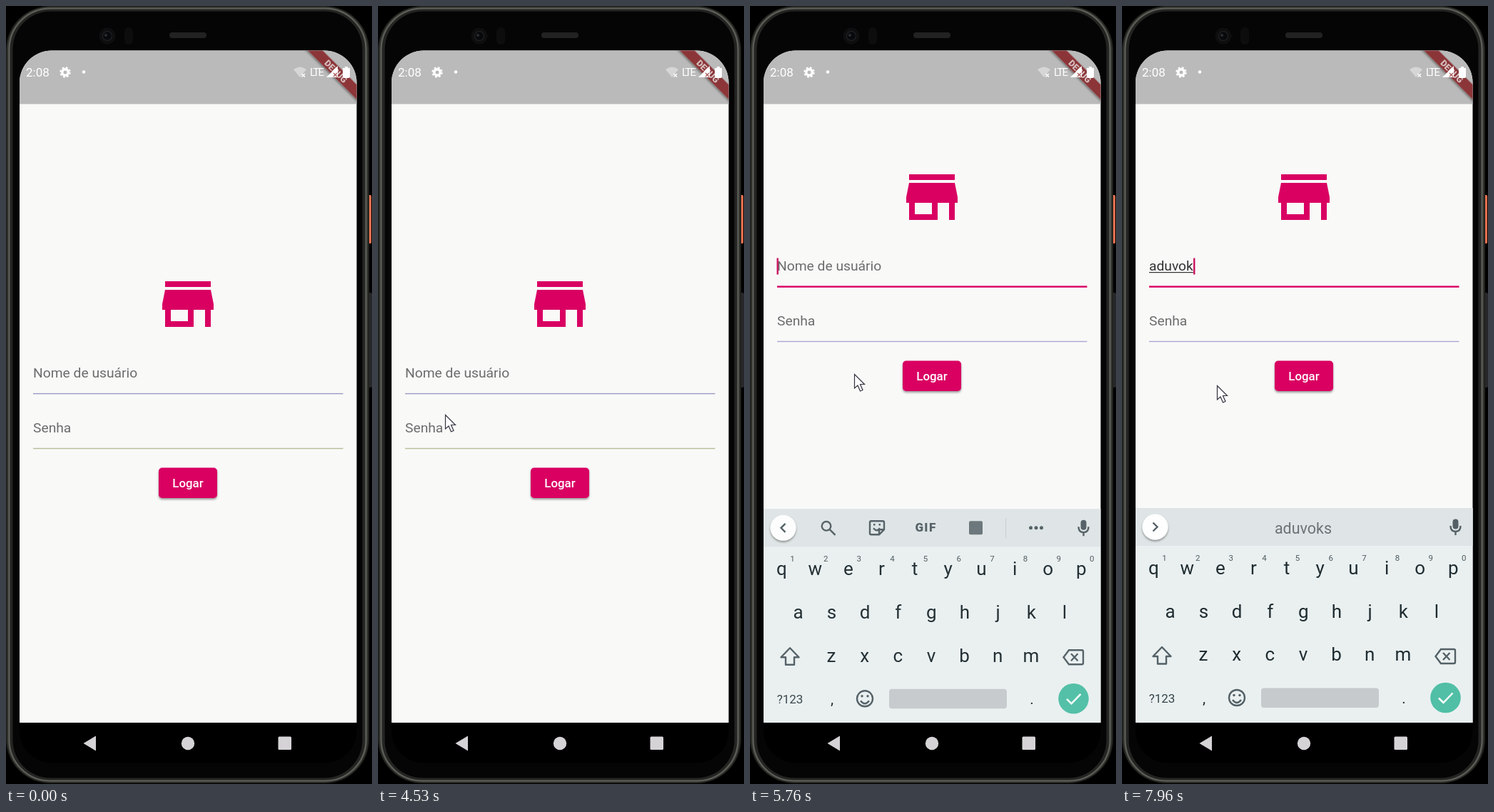
These frames come from a looping animation (513 by 1091 pixels, 8 s). An HTML page:

```html
<!DOCTYPE html>
<html lang="pt">
<head>
<meta charset="utf-8">
<title>Login</title>
<style>
  html, body { margin: 0; width: 100%; height: 100%; overflow: hidden; background: #000; }
  svg { display: block; width: 513px; height: 1091px; }
  text { font-family: Roboto, sans-serif; }
  .mid { text-anchor: middle; }
  .hint { font-size: 19.26px; fill: #6c6c6c; }
  .key { font-size: 26px; fill: #1f2c31; }
  .num { font-size: 11.5px; fill: #4e5a5f; }
  .word { font-size: 21.5px; fill: #6b7377; }
  .line { fill: none; stroke: #536066; stroke-width: 2.4; }
</style>
</head>
<body>
<svg viewBox="0 0 513 1091" xmlns="http://www.w3.org/2000/svg">
  <defs>
    <clipPath id="screen"><rect x="19" y="62.5" width="472.5" height="999" rx="45"/></clipPath>
    <clipPath id="app"><rect x="19" y="62" width="473" height="943"/></clipPath>
    <filter id="shade" x="-20%" y="-20%" width="140%" height="160%">
      <feDropShadow dx="0" dy="2" stdDeviation="1.6" flood-opacity=".4"/>
    </filter>
  </defs>

  <!-- phone body -->
  <rect width="513" height="1091"/>
  <rect x="506" y="265" width="6" height="68" rx="1.5" fill="#e5704f"/>
  <rect x="506" y="402" width="7" height="133" rx="2" fill="#26272a"/>
  <rect x="0" y="0" width="509" height="1090" rx="62" fill="#22231f"/>
  <rect x="2" y="1.5" width="505" height="1087" rx="60" fill="#3a3c37"/>
  <rect x="4.500" y="3.500" width="500" height="1083" rx="57.500" fill="#242522" stroke="#5e605a" stroke-width="2"/>
  <rect x="9.500" y="7.500" width="490" height="1075" rx="53" fill="#050506"/>
  <circle cx="142" cy="42" r="11.500" fill="#0e0e0f"/>
  <circle cx="142" cy="42" r="6.500" fill="#08090b" stroke="#1c1d20" stroke-width="1.5"/>
  <circle cx="140" cy="41" r="2" fill="#2b2e35"/>
  <rect x="166" y="30" width="12" height="24" rx="6" fill="#0d0d0e"/>
  <rect x="229" y="37" width="52" height="8" rx="4" fill="#222"/>

  <g clip-path="url(#screen)">
    <g clip-path="url(#app)">
      <rect x="19" y="62" width="473" height="944" fill="#f9f9f8"/>
      <rect x="19" y="62" width="473" height="75.500" fill="#bababa"/>

      <g id="form">
        <path transform="translate(207 370) scale(4)" fill="#d90062"
          d="M20 4H4v2h16zM21 14v-2l-1-5H4l-1 5v2h1v6h10v-6h4v6h2v-6zM12 18H6v-4h6z"/>
        <text id="user" x="38" y="521" class="hint"></text>
        <rect id="compose" x="38" y="523" height="1.2" fill="#333"/>
        <rect id="rule" x="38" width="434.5"/>
        <rect id="caret" y="503.5" width="2.4" height="23" fill="#c9145f"/>
        <text x="38" y="598" class="hint">Senha</text>
        <rect id="rule2" x="38" y="619.800" width="434.5" height="1.400"/>
        <rect x="214" y="647.5" width="82" height="42.5" rx="4.8" fill="#d90062" filter="url(#shade)"/>
        <text x="255" y="675" class="mid" font-size="16.86" font-weight="500" fill="#fff">Logar</text>
      </g>

      <!-- corner banner -->
      <g transform="translate(491.5 62.5) rotate(45)">
        <rect x="-60" y="33.7" width="120" height="14.5" fill="#8c3439" filter="url(#shade)"/>
        <text y="45.5" class="mid" font-size="12.3" font-weight="900" fill="#d6bfc0">DEBUG</text>
      </g>

      <!-- status bar -->
      <g fill="#fff">
        <text x="28" y="99" font-size="17">2:08</text>
        <circle cx="83" cy="93" r="4.2" fill="none" stroke="#fff" stroke-width="3.4"/>
        <circle cx="83" cy="93" r="6.4" fill="none" stroke="#fff" stroke-width="2.6" stroke-dasharray="2.7 2.327"/>
        <circle cx="109" cy="92.500" r="2.3"/>
        <path d="M403 89Q412 82 421 89L412 100z" opacity=".4"/>
        <path d="M414.500 95l4.500 4.500m0-4.500l-4.500 4.500" stroke="#fff" stroke-width="1.5"/>
        <text x="426" y="98" font-size="15" letter-spacing="-1.7">LTE</text>
        <path d="M449 100L465 84V100z"/>
        <path d="M459 94l5 5m0-5l-5 5" stroke="#a55" stroke-width="1.3"/>
        <path d="M472 87h3v-2h4v2h3v12q0 2-2 2h-6q-2 0-2-2z"/>
      </g>

      <g id="board">
        <rect x="19" y="704" width="473" height="310" fill="#eaf0f0"/>
        <rect x="19" y="704" width="473" height="53" fill="#dfe5e6"/>
        <g id="keys"></g>
        <circle cx="46.500" cy="730.500" r="18" fill="#fdfefd" filter="url(#shade)"/>
        <path id="chevron" class="line"/>
        <g id="tools">
          <circle cx="107" cy="728" r="6.300" class="line"/>
          <path d="M111.500 732.500l8 8" class="line" stroke-width="3"/>
          <path d="M170 721h16q2 0 2 2v10l-7 7h-11q-2 0-2-2v-15q0-2 2-2zM188 733h-7v7M173 731q5 6 9 0" class="line"/>
          <path d="M173 726h2.500m5 0h2.500" class="line"/>
          <text x="246.500" y="736" class="mid" font-size="17" font-weight="900" letter-spacing="1.400" fill="#536066">GIF</text>
          <rect x="307" y="721" width="19" height="19" rx="2" fill="#6a757a"/>
          <path d="M358.500 717v28" stroke="#c5cccd"/>
          <g fill="#536066">
            <circle cx="393.500" cy="730.500" r="2.500"/><circle cx="401" cy="730.500" r="2.500"/><circle cx="408.500" cy="730.500" r="2.500"/>
          </g>
        </g>
        <g id="words">
          <path id="bars" d="M185.500 717v28M323 717v28" stroke="#c3cacb"/>
          <text x="124" y="740" class="word mid"></text>
          <text x="254" y="740" class="word mid"></text>
          <text x="383" y="740" class="word mid"></text>
        </g>
        <rect x="463.500" y="719.500" width="8" height="14" rx="4" fill="#536066"/>
        <path d="M460.500 729q0 8 7 8t7-8M467.500 737v5" class="line" stroke-width="2"/>

        <path d="M56 899l12.500 13h-6.500v10.500h-12v-10.500h-6.500z" class="line" stroke-linejoin="round"/>
        <path d="M447 902h18q2 0 2 2v16q0 2-2 2h-18l-7.500-10zM450 907l9.500 10m0-10l-9.500 10" class="line"/>
        <text x="56" y="977" class="mid" font-size="17" fill="#36444a">?123</text>
        <text x="115" y="978" class="mid" font-size="21" fill="#1f2c31">,</text>
        <circle cx="161" cy="970" r="11" class="line"/>
        <path d="M155 973q6 8 12 0" class="line"/>
        <circle cx="157" cy="966.500" r="1.700" fill="#536066"/><circle cx="165" cy="966.500" r="1.700" fill="#536066"/>
        <rect x="195" y="956.500" width="165" height="27.500" rx="4" fill="#c6cacc"/>
        <text x="395" y="978" class="mid" font-size="21" fill="#1f2c31">.</text>
        <circle cx="453.500" cy="970" r="21.300" fill="#50bfa6"/>
        <path d="M444 970.500l6.500 6.500 13-13.500" fill="none" stroke="#fff" stroke-width="2.500"/>
      </g>
    </g>

    <!-- navigation bar -->
    <rect x="19" y="1005" width="473" height="57"/>
    <path d="M108.500 1034l17.500-10.500v21z" fill="#d6d3d6"/>
    <circle cx="255" cy="1034" r="9.200" fill="#d6d3d6"/>
    <rect x="381.500" y="1024.500" width="18.500" height="18.500" rx="1.500" fill="#d6d3d6"/>
  </g>

  <path id="mouse" d="M.5 .5V20L5 16l3.500 8 3.500-1.500L8.500 14.500H14.500z" fill="#fff" stroke="#33343f" stroke-width="1.2"/>
</svg>

<script>
const LOOP = 8000;
const TAP = 5500, LIFT = 5660, SLIDE = 5600, STRIP = 6900;
const $ = id => document.getElementById(id);
const set = (el, attrs) => { for (const k in attrs) el.setAttribute(k, attrs[k]); };
const show = (el, on) => set(el, { visibility: on ? 'visible' : 'hidden' });
const clamp = x => Math.max(0, Math.min(1, x));

// last entry whose start time has passed
const at = (steps, t) => steps.reduce((hit, s) => t >= s[0] ? s : hit, steps[0]);

const mousePath = [[0], [4530, 94, 573], [4930, 112, 557], [5000, 132, 538], [5060, 146, 525],
  [5360, 146, 520], [5500, 146, 516], [6460, 133, 532]];
const typed = [[0, ''], [7000, 'a'], [7130, 'ad'], [7270, 'adu'], [7400, 'aduv'], [7560, 'aduvo'], [7730, 'aduvok']];
const offers = [[STRIP, 'a', 'and', 'also'], [7100, 'ad', 'add', 'adult'], [7240, 'adu', 'adult', 'add'],
  [7370, '', 'aduv', ''], [7530, '', 'aduvo', ''], [7700, '', 'aduvok', ''], [7930, '', 'aduvoks', '']];

function addText(x, y, cls, str) {
  const el = document.createElementNS('http://www.w3.org/2000/svg', 'text');
  set(el, { x, y, class: cls + ' mid' });
  el.textContent = str;
  $('keys').append(el);
}
[['qwertyuiop', 44.5], ['asdfghjkl', 67.7], ['zxcvbnm', 114]].forEach(([row, x0], r) =>
  [...row].forEach((c, i) => {
    const x = x0 + i * 46.65;
    addText(x, 797 + r * 60.7, 'key', c);
    if (!r) addText(x + 15, 778, 'num', (i + 1) % 10);
  }));

function drawField(t) {
  const text = at(typed, t)[1], user = $('user');
  user.textContent = text || 'Nome de usuário';
  user.style.fill = text ? '#333' : '';
  const width = text ? user.getComputedTextLength() : 0;
  set($('compose'), { width });
  set($('caret'), { x: 37.5 + width + (text ? .7 : 0) });
  show($('caret'), t >= TAP && !(t >= 6100 && t < 6600));

  const lifted = t >= LIFT;
  const focus = clamp((t - TAP) / 200);
  const mix = (a, b) => Math.round(a + (b - a) * focus);
  const height = 1.4 + focus;
  set($('rule'), { y: 543.6 - height / 2, height, fill: `rgb(${mix(154, 217)},${mix(154, 0)},${mix(194, 98)})` });
  set($('rule2'), { fill: lifted ? '#a8a8d0' : '#b4be94' });
  set($('form'), { transform: `translate(0 ${lifted ? -150 : 0})` });
}

function drawBoard(t) {
  const up = t >= LIFT, left = 1 - clamp((t - SLIDE) / 300);
  const words = t >= STRIP;
  set($('board'), {
    display: up ? 'inline' : 'none',
    opacity: clamp((t - SLIDE) / 165),
    transform: `translate(0 ${60 * left ** 5})`
  });
  set($('chevron'), { d: words ? 'M43.500 724.500l6 6-6 6' : 'M49.500 724.500l-6 6 6 6' });
  show($('tools'), !words);
  set($('words'), { display: words ? 'inline' : 'none' });
  const offer = at(offers, t);
  $('words').querySelectorAll('text').forEach((el, i) => { el.textContent = offer[i + 1]; });
  show($('bars'), offer[1]);
}

function draw(now) {
  const t = now % LOOP;
  const [start, x, y] = at(mousePath, t);
  set($('mouse'), { display: start ? 'inline' : 'none', transform: `translate(${x || 0} ${y || 0})` });
  drawField(t);
  drawBoard(t);
}

const begin = performance.now();
function tick() {
  draw(performance.now() - begin);
  requestAnimationFrame(tick);
}
tick();
</script>
</body>
</html>
```
